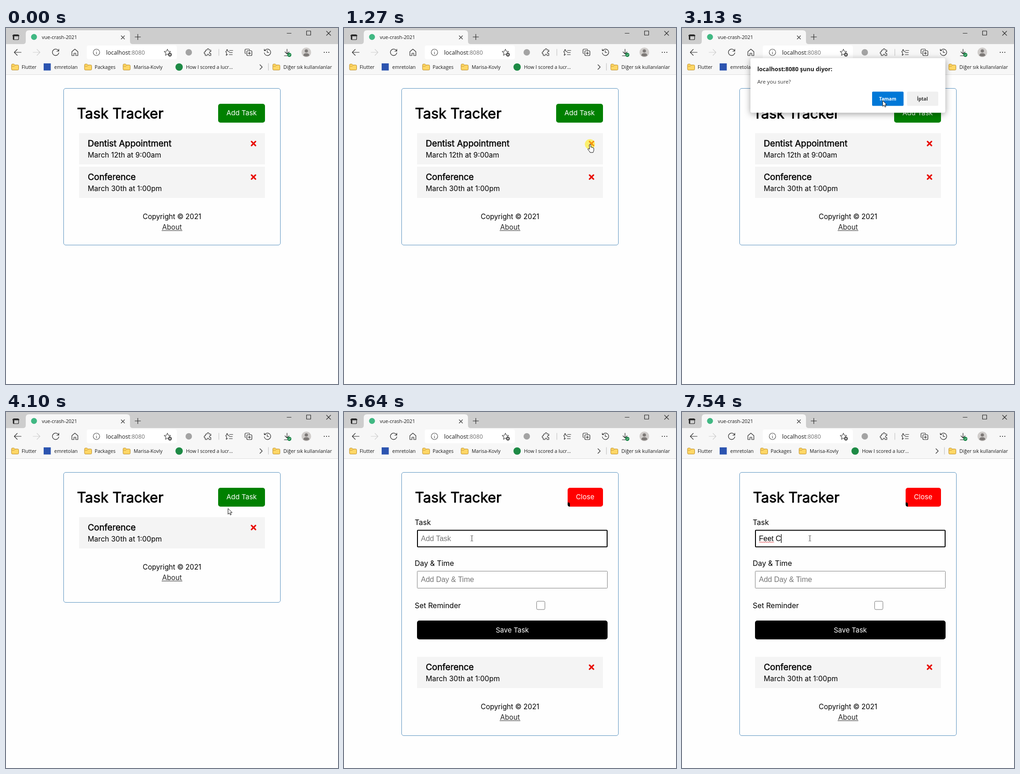
An HTML page for the animation above (8000 ms loop, 723 by 775 pixels).

```html
<!DOCTYPE html>
<html lang="en">
<head>
<meta charset="utf-8">
<title>Task Tracker</title>
<style>
html, body { margin: 0; width: 100%; height: 100%; overflow: hidden; background: #fefefe; }
svg { display: block; width: 723px; height: 775px; }
text { white-space: pre; }
.page text { font: 15.9px Inter, sans-serif; }
.page text.h1 { font-size: 31px; stroke: #000; stroke-width: .8px; }
.page text.h3 { font-size: 18.9px; stroke: #000; stroke-width: .5px; }
.page text.when { font-size: 15.6px; }
.page text.btn { font-size: 15px; fill: #fff; text-anchor: middle; }
.page text.mid { font-size: 15.2px; text-anchor: middle; }
.page text.field { font: 16px "Liberation Sans", Arial, sans-serif; fill: #757575; }
.ui text { font: 10.6px "Open Sans", "Noto Sans", sans-serif; fill: #1b1b1b; }
.ui text.tab { font-size: 10.8px; }
.ui text.url { font-size: 12.5px; }
.ui text.strong { font-size: 12.6px; font-weight: 700; }
.ui text.ask { font-size: 11.6px; fill: #3a3a3a; }
.ui text.act { font-size: 10.2px; font-weight: 700; text-anchor: middle; }
.ui text.hint { font-size: 9.4px; fill: #767676; }
.ui text.saved { font-size: 11.5px; }
.line { fill: none; stroke: #2b2b2b; stroke-width: 1.2; stroke-linecap: round; stroke-linejoin: round; }
.shade { filter: drop-shadow(0 3px 7px rgba(0,0,0,.36)); }
.cur { fill: #fff; stroke: #111; stroke-linejoin: round; }
</style>
</head>
<body>
<svg viewBox="0 0 723 775">
  <defs>
    <g id="folder">
      <path d="M.5 2.5q0-2 2-2h3.5l2 2h6q2 0 2 2v7q0 2-2 2h-11.5q-2 0-2-2z" fill="#ffd766" stroke="#bd8b22"/>
      <path d="M1 5.2h5.5l2-2" fill="none" stroke="#c99a35"/>
    </g>
    <path id="star" d="M0-7 2-2.4 7-2 3.2 1.5 4.3 6.5 0 4-4.3 6.5-3.2 1.5-7-2-2-2.4z"/>
    <path id="cross" d="M-4.3-4.3 4.3 4.3M4.3-4.3-4.3 4.3" fill="none" stroke="#e80c04" stroke-width="3.3" stroke-linecap="round"/>
    <g id="task">
      <rect x="159" width="405" height="68" fill="#f4f4f4"/>
      <use href="#cross" x="539" y="22.5"/>
    </g>
  </defs>
  <rect width="723" height="775" fill="#fefefe"/>

  <g class="ui">
    <rect width="723" height="35" fill="#cdcdcd"/>
    <rect y="35" width="723" height="66" fill="#f7f7f7"/>
    <path d="M0 101.5H723" stroke="#dedede"/>
    <path d="M37 35q6 0 6-6V12q0-7 7-7H263q7 0 7 7v17q0 6 6 6z" fill="#f7f7f7"/>
    <circle cx="61" cy="19.5" r="6.5" fill="#41b883"/>
    <text class="tab" x="78" y="23.5">vue-crash-2021</text>
    <g class="line">
      <rect x="15.5" y="14.5" width="12" height="11" rx="2"/>
      <path d="M15.5 16.5h12" stroke-width="3"/>
      <path d="M17 17v7" stroke-width="2"/>
      <path d="M251 17l7 7M258 17l-7 7M287 13.5v12M281 19.5h12"/>
      <path d="M612 11.5h9M698 7l9 9M707 7l-9 9"/>
      <rect x="654.5" y="6.5" width="9" height="9"/>
    </g>
    <rect x="176" y="38" width="196" height="30" rx="4" fill="#fff"/>
    <g class="line">
      <path d="M33 53H18M24.5 46.5 18 53l6.500 6.500"/>
      <path d="M59 53H74M67.5 46.5 74 53l-6.500 6.500" stroke="#cfcfcf"/>
      <path d="M114.5 50A7 7 0 1 0 115 54M115 46v4.500h-4.500"/>
      <path d="M143.5 51.5 150 46l6.500 5.500V60h-4.500v-5h-4v5h-4.500z"/>
      <g stroke="#555">
        <circle cx="197" cy="53" r="7"/>
        <path d="M197 52.5v4M197 49.5v.1"/>
        <use href="#star" x="351.5" y="53"/>
      </g>
      <path d="M463.5 46v14M571.5 77v15" stroke="#c6c6c6"/>
      <path d="M435 48h3q-.5-3 2-3t2 3h4v3.500q-3-.5-3 2t3 2V60h-4q.5-3-2-3t-2 3h-4v-3.500q-2.500 0-2.500-2.500t2.500-2z"/>
      <path d="M486.5 51h-3l-2-4.500-2 4.500-1 .5 2 3-1 5 3-2M487 49h7M486 53.5h7M486 58h7"/>
      <path d="M522 56q-1.500-.5-1.500-2v-6q0-2 2-2h6q2 0 2 2"/>
      <rect x="524.5" y="49.5" width="11" height="10.5" rx="2"/>
      <path d="M530 52v5.500M527.3 54.800h5.500"/>
      <path d="M564 48.5A7 7 0 1 1 562.5 54M562.5 46v3.500h3.500M569 49v4.500h3.500"/>
      <path d="M612 46v10M607.5 52l4.500 4.500 4.500-4.500M606 60.5h7"/>
      <path d="M553 80l5 5-5 5"/>
    </g>
    <circle cx="357" cy="58" r="4.2" fill="#555"/>
    <path d="M357 56v4M355 58h4" stroke="#fff"/>
    <circle cx="398" cy="53" r="7" fill="#a3a3a3"/>
    <circle cx="617" cy="58.5" r="4.5" fill="#1f8a4c"/>
    <path d="M615 58.5l1.500 1.500 2.700-3" fill="none" stroke="#fff"/>
    <circle cx="654" cy="53" r="10.5" fill="#d0cdcb"/>
    <circle cx="654" cy="50" r="3.6" fill="#7d7977"/>
    <path d="M647.5 60q0-5 6.500-5t6.500 5q-6.500 4-13 0z" fill="#7d7977"/>
    <path d="M693 53h.1M698 53h.1M703 53h.1" stroke="#2b2b2b" stroke-width="2.2" stroke-linecap="round"/>
    <text class="url" x="218" y="57.5">localhost<tspan fill="#707070">:8080</tspan></text>
    <use href="#folder" x="11.5" y="78"/>
    <use href="#folder" x="170.5" y="78"/>
    <use href="#folder" x="254.5" y="78"/>
    <use href="#folder" x="580.5" y="78"/>
    <rect x="82" y="77" width="15.5" height="15.5" fill="#2c54b0"/>
    <circle cx="377" cy="85" r="8" fill="#1d8a45"/>
    <text x="34" y="89">Flutter</text>
    <text x="105" y="89">emretolan</text>
    <text x="193" y="89">Packages</text>
    <text x="278" y="89">Marisa-Kovly</text>
    <text x="392" y="89">How I scored a lucr...</text>
    <text x="604" y="89">Diğer sık kullanılanlar</text>
  </g>

  <g class="page">
    <rect id="card" x="125.5" y="131.5" width="472" rx="4.5" fill="none" stroke="#5a93c0"/>
    <text class="h1" x="154.5" y="196.5">Task Tracker</text>
    <g id="add">
      <rect x="462" y="165" width="102" height="41" rx="5" fill="#008000"/>
      <text class="btn" x="513" y="190">Add Task</text>
    </g>
    <g id="form">
      <rect x="487" y="165" width="77" height="41" rx="5" fill="#f00"/>
      <path d="M487 197h3.500l1.500 3v6q-5 0-5-5z"/>
      <text class="btn" x="525" y="190">Close</text>
      <text x="154" y="246">Task</text>
      <rect id="input" fill="#fff"/>
      <text id="typed" class="field" x="167.5" y="281"></text>
      <path id="wave" fill="none" stroke="#d8262c"/>
      <rect id="caret" y="266" width="1.3" height="19"/>
      <text x="154" y="335">Day &amp; Time</text>
      <rect x="159.5" y="346.5" width="414" height="37" rx="1" fill="#fff" stroke="#808080"/>
      <text class="field" x="167.5" y="370">Add Day &amp; Time</text>
      <text x="154" y="427">Set Reminder</text>
      <rect x="419.5" y="412" width="18" height="18" rx="2.5" fill="#fff" stroke="#767676"/>
      <rect x="159" y="454" width="415" height="41" rx="5"/>
      <text class="btn" x="366.5" y="480">Save Task</text>
    </g>
    <g id="first" transform="translate(0 229)">
      <use href="#task"/>
      <text class="h3" x="178" y="29">Dentist Appointment</text>
      <text class="when" x="178" y="53">March 12th at 9:00am</text>
    </g>
    <g id="second">
      <use href="#task"/>
      <text class="h3" x="178" y="29">Conference</text>
      <text class="when" x="178" y="53">March 30th at 1:00pm</text>
    </g>
    <g id="foot">
      <text class="mid" x="361.5" y="114">Copyright © 2021</text>
      <text class="mid" x="361.5" y="136.5" fill="#222">About</text>
      <path d="M339 139h45" stroke="#222"/>
    </g>
  </g>

  <g class="ui">
    <g id="popup">
      <rect class="shade" x="162" y="295" width="378" height="69.5" fill="#fff"/>
      <text class="hint" x="176" y="316">Kaydedilmiş veriler</text>
      <path class="line" d="M522 308l8.500 8.500M530.5 308l-8.500 8.500"/>
      <text class="saved" x="175" y="349">ff</text>
    </g>
    <g id="dialog">
      <rect class="shade" x="149" y="65.5" width="424.5" height="119" rx="4" fill="#fff"/>
      <text class="strong" x="164" y="94">localhost:8080 şunu diyor:</text>
      <text class="ask" x="164" y="120.5">Are you sure?</text>
      <rect x="414" y="138.5" width="68.5" height="31" rx="2" fill="#0078d7"/>
      <rect x="490" y="138.5" width="68" height="31" rx="2" fill="#f0f0f0"/>
      <text class="act" x="448" y="157.5" style="fill:#fff">Tamam</text>
      <text class="act" x="523.5" y="157.5" style="fill:#333">İptal</text>
    </g>
  </g>

  <g id="mouse">
    <circle id="click" cx="-.5" r="11" fill="#ffec1c" opacity=".62"/>
    <path id="arrow" class="cur" d="M0 0V12.5L3 9.8 5 14.2 7 13.3 5.1 9H9z"/>
    <path id="hand" class="cur" d="M-1.5 11V1.5Q-1.5 0 0 0T1.5 1.5V6.5Q3.8 5.3 4 7.2 5.9 6.2 6.2 8 8 7.3 8 9.3V13Q8 15 6.3 18H0Q-1.5 15-4.5 12-5.5 9.5-3.5 9.5z"/>
    <path id="beam" d="M-2.5-6Q-.5-6 0-5 .5-6 2.5-6M0-5V5M-2.5 6Q-.5 6 0 5 .5 6 2.5 6" fill="none" stroke="#333"/>
  </g>
</svg>
<script>
const LOOP = 8000;
const $ = id => document.getElementById(id);
const set = (id, attrs) => { for (const k in attrs) $(id).setAttribute(k, attrs[k]); };
const show = (id, on) => { $(id).style.display = on ? '' : 'none'; };
const within = (t, a, b) => t >= a && t < b;
const ramp = (t, a, b) => Math.min(1, Math.max(0, (t - a) / (b - a)));
const ease = p => p * p * (3 - 2 * p);
// Latest value whose start time has passed
const stepAt = (list, t) => list.reduce((v, [at, next]) => t >= at ? next : v, list[0][1]);

const route = [
  [100, 562, 372], [640, 533, 255], [890, 533, 255], [960, 536, 253],
  [1810, 536, 253], [2400, 440, 160], [2710, 440, 160], [2900, 437, 158],
  [3760, 437, 158], [4100, 483.5, 210], [4300, 488, 189], [4540, 488, 189], [4960, 278.5, 275]
];
const shapes = [[0, 'arrow'], [600, 'hand'], [1590, 'arrow'], [4230, 'hand'], [4620, 'arrow'], [4860, 'beam']];
const typing = [[0, ''], [6060, 'F'], [6270, 'Fe'], [6490, 'Fee'], [6800, 'Feet'], [6960, 'Feet '], [7540, 'Feet C']];
const clicks = [[1270, 1400], [3180, 3270], [4370, 4470], [5110, 5210]];

set('wave', { d: 'M168 284.5' + 'l2-2l2 2'.repeat(8) });

function pointer(t) {
  const i = route.findIndex(p => p[0] > t);
  if (i < 0) return route[route.length - 1].slice(1);
  if (i === 0) return route[0].slice(1);
  const [t0, x0, y0] = route[i - 1], [t1, x1, y1] = route[i];
  const p = ease(ramp(t, t0, t1));
  return [x0 + (x1 - x0) * p, y0 + (y1 - y0) * p];
}

function drawPage(t) {
  const removed = t >= 3450, open = t >= 4470;
  show('add', !open);
  show('form', open);
  show('first', !removed);
  const top = open ? 533 : removed ? 229 : 302;
  set('second', { transform: `translate(0 ${top})` });
  set('foot', { transform: `translate(0 ${top})` });
  set('card', { height: open ? 573 : removed ? 283 : 341 });
}

function drawField(t) {
  const focus = t >= 5110, value = stepAt(typing, t);
  const inset = focus ? 1 : .5;
  set('input', {
    x: 159 + inset, y: 256.5 + inset, width: 415 - 2 * inset, height: 38 - 2 * inset, rx: 1,
    'stroke-width': 2 * inset, stroke: focus ? '#000' : t >= 4860 ? '#555' : '#808080'
  });
  const text = $('typed');
  text.textContent = value || 'Add Task';
  text.style.fill = value ? '#000' : '';
  show('caret', focus && !within(t, 5640, 6060) && !within(t, 7470, 7540));
  set('caret', { x: 167.5 + (value ? text.getComputedTextLength() : 0) });
  show('wave', t >= 6960);
}

function drawLayers(t) {
  const dialog = ramp(t, 1380, 1590) * (1 - ramp(t, 3220, 3300));
  const popup = t < 6130 ? 0 : 1 - ramp(t, 6270, 6430);
  for (const [id, alpha] of [['dialog', dialog], ['popup', popup]]) {
    show(id, alpha > 0);
    set(id, { opacity: alpha });
  }
}

function drawMouse(t) {
  const [x, y] = pointer(t), shape = stepAt(shapes, t);
  show('mouse', t >= 100);
  set('mouse', { transform: `translate(${x} ${y})` });
  for (const id of ['arrow', 'hand', 'beam']) show(id, id === shape);
  show('click', clicks.some(([a, b]) => within(t, a, b)));
}

function draw(t) {
  drawPage(t);
  drawField(t);
  drawLayers(t);
  drawMouse(t);
}

const start = performance.now();
function tick(now) {
  draw(Math.max(0, now - start) % LOOP);
  requestAnimationFrame(tick);
}
draw(0);
requestAnimationFrame(tick);
</script>
</body>
</html>
```
